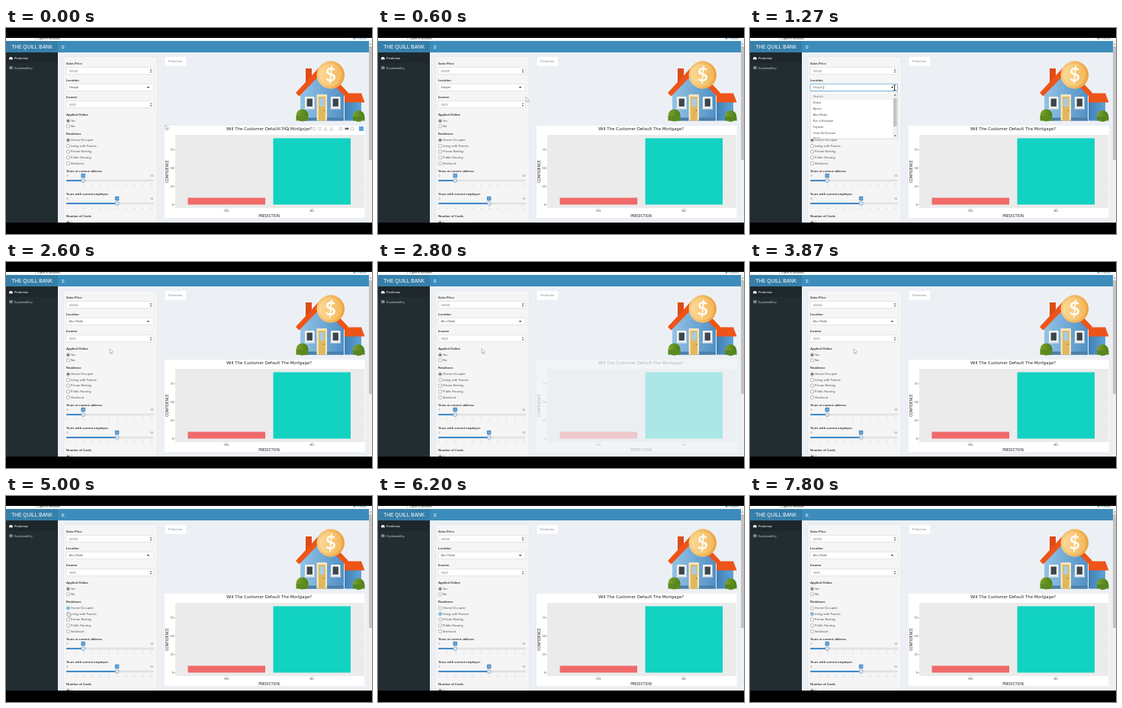
Recreate the animation shown at these times as an HTML page with a canvas. Size 480 px wide and 270 px high, loop 8 s.

```html
<!DOCTYPE html>
<html lang="en">
<head>
<meta charset="utf-8">
<title>Mortgage dashboard</title>
<style>
html, body { margin: 0; width: 100%; height: 100%; overflow: hidden; background: #000; }
canvas { display: block; width: 480px; height: 270px; }
</style>
</head>
<body>
<canvas id="stage" width="480" height="270"></canvas>
<script>
const c = document.getElementById('stage').getContext('2d');
const LOOP = 8000;
const UI = 'Lato, "Open Sans", sans-serif';
const PLOT = '"DejaVu Sans", sans-serif';
const HEAD = '"Liberation Sans", sans-serif';

const clamp = v => Math.max(0, Math.min(1, v));
const ramp = (t, a, b) => clamp((t - a) / (b - a));
const ease = p => p * p * (3 - 2 * p);

function rect(x, y, w, h, fill) {
  c.fillStyle = fill;
  c.fillRect(x, y, w, h);
}

function paint(fill, line, lw) {
  c.fillStyle = fill;
  c.fill();
  if (line) { c.strokeStyle = line; c.lineWidth = lw; c.stroke(); }
}

function box(x, y, w, h, fill, line, r = 0, lw = 0.6) {
  c.beginPath();
  c.roundRect(x, y, w, h, r);
  paint(fill, line, lw);
}

function disc(x, y, r, fill, line, lw = 0.6) {
  c.beginPath();
  c.arc(x, y, r, 0, 7);
  paint(fill, line, lw);
}

function poly(points, fill, line, lw = 0.6) {
  c.beginPath();
  for (let i = 0; i < points.length; i += 2) c.lineTo(points[i], points[i + 1]);
  c.closePath();
  paint(fill, line, lw);
}

// Small type is set large and scaled down so that spacing stays fractional.
function text(s, x, y, size, fill, { weight = 400, font = UI, align = 'left', turn = 0 } = {}) {
  c.save();
  c.translate(x, y);
  c.rotate(turn);
  c.scale(0.1, 0.1);
  c.font = `${weight} ${size * 10}px ${font}`;
  c.textAlign = align;
  c.fillStyle = fill;
  c.fillText(s, 0, 0);
  c.restore();
}

const label = (s, y) => text(s, 79, y, 4.35, '#333', { weight: 700 });

function clipped(x, y, w, h, draw) {
  c.save();
  c.beginPath();
  c.rect(x, y, w, h);
  c.clip();
  draw();
  c.restore();
}

function shade(x0, x1, from, to) {
  const g = c.createLinearGradient(x0, 0, x1, 0);
  g.addColorStop(0, from);
  g.addColorStop(1, to);
  return g;
}

function frame() {
  rect(0, 0, 480, 270, '#000');
  rect(0, 13, 480, 242, '#ecf0f5');
  rect(0, 13, 480, 4, '#fbfbfb');
  clipped(0, 13, 480, 4, () => {
    text('Open in Browser', 41.5, 15, 4, '#444');
    text('Publish', 460, 15.2, 4, '#5a84a0');
    disc(457, 13.7, 1.4, '#6aa3c8');
    rect(38, 13, 0.6, 3, '#bbb');
  });
  rect(0, 17, 68, 15, '#367fa9');
  rect(68, 17, 408, 15, '#3c8dbc');
  text('THE QUILL BANK', 7.3, 26.8, 6.6, '#fff', { font: HEAD });
  for (let i = 0; i < 3; i++) rect(73, 23.2 + i * 1.5, 3.4, 0.7, '#dcebf4');

  rect(0, 32, 68, 223, '#222d32');
  rect(0, 32, 68, 14, '#1e282c');
  c.beginPath();
  c.arc(6.5, 40.4, 2.4, Math.PI * 0.9, Math.PI * 0.1);
  paint('#fff');
  text('Prediction', 11, 40.9, 4.1, '#fff');
  rect(4.5, 50.5, 4, 3.4, '#9aa9b0');
  rect(5, 52, 3, 0.5, '#222d32');
  text('Explainability', 11, 53.9, 4.1, '#b8c7ce');

  rect(476, 17, 4, 238, '#f1f1f1');
  rect(476, 24, 4, 149, '#c4c4c4');
  poly([476.7, 21.5, 478, 20, 479.3, 21.5], '#777');
}

function numberField(y, value) {
  box(79, y, 114.5, 9, '#fff', '#d8d8d8');
  text(value, 82.5, y + 6, 4, '#777');
  poly([188.8, y + 3.9, 190, y + 2.3, 191.2, y + 3.9], '#444');
  poly([188.8, y + 5.6, 190, y + 7.2, 191.2, y + 5.6], '#444');
}

function radio(y, name, on, tint) {
  disc(81.5, y, 2.2, '#fff', tint || '#888');
  if (on) disc(81.5, y, 1.25, tint || '#444');
  text(name, 85, y + 1, 4.05, '#555');
}

function slider(y, value) {
  const step = 2.22, x = 79 + value * step;
  text('0', 79.5, y - 5.2, 3.2, '#777');
  text('50', 193, y - 5.2, 3.2, '#777', { align: 'right' });
  box(x - 2.7, y - 9.3, 5.4, 5.6, '#428bca', null, 0.8);
  text(value, x, y - 5.4, 3.2, '#cfe2f2', { align: 'center' });
  box(79, y - 1, 114.5, 2, '#e6e6e6', '#d2d2d2', 1, 0.4);
  box(79, y - 1.1, x - 79, 2.2, '#428bca', null, 1);
  for (let i = 0; i <= 50; i += 5) {
    rect(79.3 + i * step, y + 2.8, 0.35, 1.6, '#bbb');
    text(i, 79.6 + i * step, y + 6.8, 2.2, '#aaa', { align: 'center' });
  }
  disc(x, y, 2.5, '#dfe6ee', '#6f93b3', 0.6);
}

function form(t) {
  const open = t >= 1270 && t < 2070;
  box(75.5, 37.5, 123, 225, '#f5f5f5', '#e3e5e8', 1);
  label('Sales Price', 47.6);
  numberField(51.5, '50000');
  label('Location', 69.8);
  box(79, 73.3, 114.5, 9.2, '#fff', open ? '#74b3dc' : '#d8d8d8', 0.5, open ? 0.9 : 0.6);
  text(t < 2070 ? 'Sharjah' : 'Abu Dhabi', 82.5, 79.4, 4, open ? '#777' : '#555');
  if (open) rect(96.6, 75.7, 0.5, 4.6, '#333');
  poly([184.9, 77, 188.1, 77, 186.5, 79], '#333');
  label('Income', 92.3);
  numberField(95.7, '5000');

  label('Applied Online', 114.6);
  radio(121.7, 'Yes', true);
  radio(128.8, 'No', false);
  label('Residence', 140);
  const moved = t >= 5130;
  const focus = '#3f93c4';
  radio(147, 'Owner Occupier', !moved, t >= 4950 && !moved ? focus : null);
  radio(154.6, 'Living with Parents', moved, moved ? focus : null);
  radio(162.1, 'Private Renting', false);
  radio(169.8, 'Public Housing', false);
  radio(177.5, 'Sheltered', false);

  label('Years at current address:', 188.5);
  slider(200, 10);
  label('Years with current employer:', 218.6);
  slider(230, 30);
  label('Number of Cards', 248.1);
  radio(255, '1', true);

  if (open) options(t);
}

function options(t) {
  const towns = ['Sharjah', 'Dubai', 'Ajman', 'Abu Dhabi', 'Ras al Khaimah',
    'Fujairah', 'Umm Al-Quwain', 'Al Ain'];
  const hover = t < 1780 ? 0 : 3;
  box(79, 83.3, 114.5, 61.7, '#fff', '#c6c6c6');
  clipped(79, 83.3, 114.5, 61.5, () => {
    rect(79.3, 86 + hover * 7.85, 108, 7.8, '#f1f3f4');
    towns.forEach((s, i) => text(s, 82.5, 91.4 + i * 7.85, 4.05, i === hover ? '#6b7780' : '#555'));
  });
  rect(187.5, 83.7, 5.6, 61, '#f1f1f1');
  rect(188.1, 92, 4.4, 37, '#c3c3c3');
  poly([188.8, 88.5, 190.3, 86.7, 191.8, 88.5], '#555');
  poly([188.8, 140.5, 190.3, 142.3, 191.8, 140.5], '#555');
}

function bush(x, y, r) {
  disc(x, y, r, shade(x - r, x + r, '#7da32c', '#4c7d1b'));
}

function house() {
  const red = '#ee5418';
  // Side wing
  rect(444, 95, 22, 26.5, shade(444, 466, '#3f7fb5', '#5fa3d6'));
  poly([444, 85.5, 466, 85.5, 470.5, 97.5, 444, 97.5], red);
  // Main house under its gable
  rect(393, 53, 8, 22, '#dd4c17');
  poly([386, 121.5, 386, 82, 414, 54, 443, 82, 443, 121.5], shade(386, 443, '#93c3e6', '#5290c4'));
  poly([380, 85, 414, 48, 449, 85, 444.5, 89.5, 414, 59, 384.5, 89.5], red);
  rect(386, 117.5, 57, 4, '#4b7fa9');
  for (const x of [392, 426]) {
    box(x, 90, 12.5, 15.5, '#f4f3ee', null, 1);
    rect(x + 2.6, 92.6, 7.3, 10.3, '#3d454e');
    rect(x - 0.5, 104.5, 13.5, 2, '#dfe5ea');
  }
  box(407.5, 87, 13.5, 34.5, '#f3e6bf', null, 1);
  rect(409.8, 90, 9, 31.5, '#e2b75c');
  rect(411.3, 92, 6, 11, '#a9cbe0');
  disc(417.5, 108, 0.8, '#8a5d22');
  bush(388.5, 114.5, 8);
  rect(380.5, 115, 16, 6.5, '#5c8a20');
  bush(462.5, 115.5, 7.5);
  rect(455, 116, 15.5, 5.5, '#568620');

  disc(425.8, 61.5, 18.2, shade(408, 444, '#f9cf82', '#eda23f'));
  disc(425.8, 61.5, 15, shade(411, 441, '#fbd996', '#f3b75a'));
  text('$', 425.8, 70.2, 25, '#fffaf0', { weight: 700, align: 'center' });
}

function toolbar() {
  const ink = '#c4c4c4';
  for (const x of [354, 361.5, 377, 384.5, 404, 411.5, 439, 454]) {
    box(x - 1.8, 130.2, 3.6, 3.6, 'transparent', ink, 0.4, 0.9);
  }
  for (const x of [392, 419, 426.5]) {
    poly([x - 2, 134, x, 130, x + 2, 134], 'transparent', ink, 0.9);
  }
  disc(368.3, 131.4, 1.8, '#fff', '#666', 0.9);
  rect(369.5, 133, 1.8, 1.2, '#666');
  rect(444.5, 130.7, 5, 2.6, '#666');
  rect(463, 129, 6, 6, '#5aa5dc');
}

function chart(t) {
  const fade = ease(ramp(t, 2620, 2800)) - ease(ramp(t, 3480, 3670));
  const mid = { font: PLOT, align: 'center' };
  c.save();
  // Each part is laid on the page colour so that overlaps do not show through.
  const veil = (x, y, w, h, fill) => {
    c.globalAlpha = 1;
    rect(x, y, w, h, '#ecf0f5');
    c.globalAlpha = 1 - 0.7 * fade;
    rect(x, y, w, h, fill);
  };
  veil(208, 128, 262.5, 121, '#fff');
  veil(222, 140, 248, 96, '#ebebeb');
  for (let i = 0; i < 4; i++) {
    const y = 231.6 - i * 24;
    rect(222, y - 0.3, 248, 0.6, '#f2f2f2');
    rect(220.8, y - 0.3, 1.2, 0.6, '#777');
    text(i * 25, 220, y + 1.3, 3.6, '#4d4d4d', { font: PLOT, align: 'right' });
  }
  for (const [x, name] of [[289, 'YES'], [401.2, 'NO']]) {
    rect(x - 0.3, 140, 0.6, 96, '#f2f2f2');
    rect(x - 0.3, 236, 0.6, 1.2, '#777');
    text(name, x, 241.3, 3.6, '#4d4d4d', mid);
  }
  veil(238.5, 222.5, 101.5, 9, '#f06a6a');
  veil(350.5, 144.5, 101.5, 87, '#12d2c2');
  text('Will The Customer Default The Mortgage?', 345, 134.4, 5.36, '#222', mid);
  text('PREDICTION', 345, 247.6, 4.5, '#222', mid);
  text('CONFIDENCE', 213, 188, 4.5, '#222', { ...mid, turn: -Math.PI / 2 });
  if (t < 260) toolbar();
  c.restore();
}

// Pointer stops: time, x, y
const stops = [[0, 209, 127], [100, 209, 127], [870, 188, 76], [1620, 188, 76],
  [1870, 136, 113.5], [4230, 136, 113.5], [4670, 81, 152]];

function pointer(t) {
  if (t > 5400) return;
  if (t > 930 && t < 1640) {
    rect(189.2, 75, 0.9, 6.5, '#222');
    rect(188, 74.6, 3.3, 0.7, '#222');
    rect(188, 81.2, 3.3, 0.7, '#222');
    return;
  }
  let i = 0;
  while (i < stops.length - 2 && t >= stops[i + 1][0]) i++;
  const [a, b] = [stops[i], stops[i + 1]];
  const p = ease(ramp(t, a[0], b[0]));
  c.save();
  c.translate(a[1] + (b[1] - a[1]) * p, a[2] + (b[2] - a[2]) * p);
  poly([0, 0, 0, 6.2, 1.4, 4.9, 2.5, 7.2, 3.5, 6.7, 2.5, 4.6, 4.4, 4.4], '#fff', '#909090', 0.6);
  c.restore();
}

function draw(now) {
  const t = now % LOOP;
  frame();
  clipped(68, 32, 408, 223, () => {
    form(t);
    box(208, 37.5, 28.5, 12.5, '#fff', '#e3e6ea', 1, 0.5);
    text('Prediction', 213, 45.2, 4.1, '#8a8a8a');
    house();
    chart(t);
    pointer(t);
  });
  requestAnimationFrame(draw);
}
requestAnimationFrame(draw);
</script>
</body>
</html>
```
